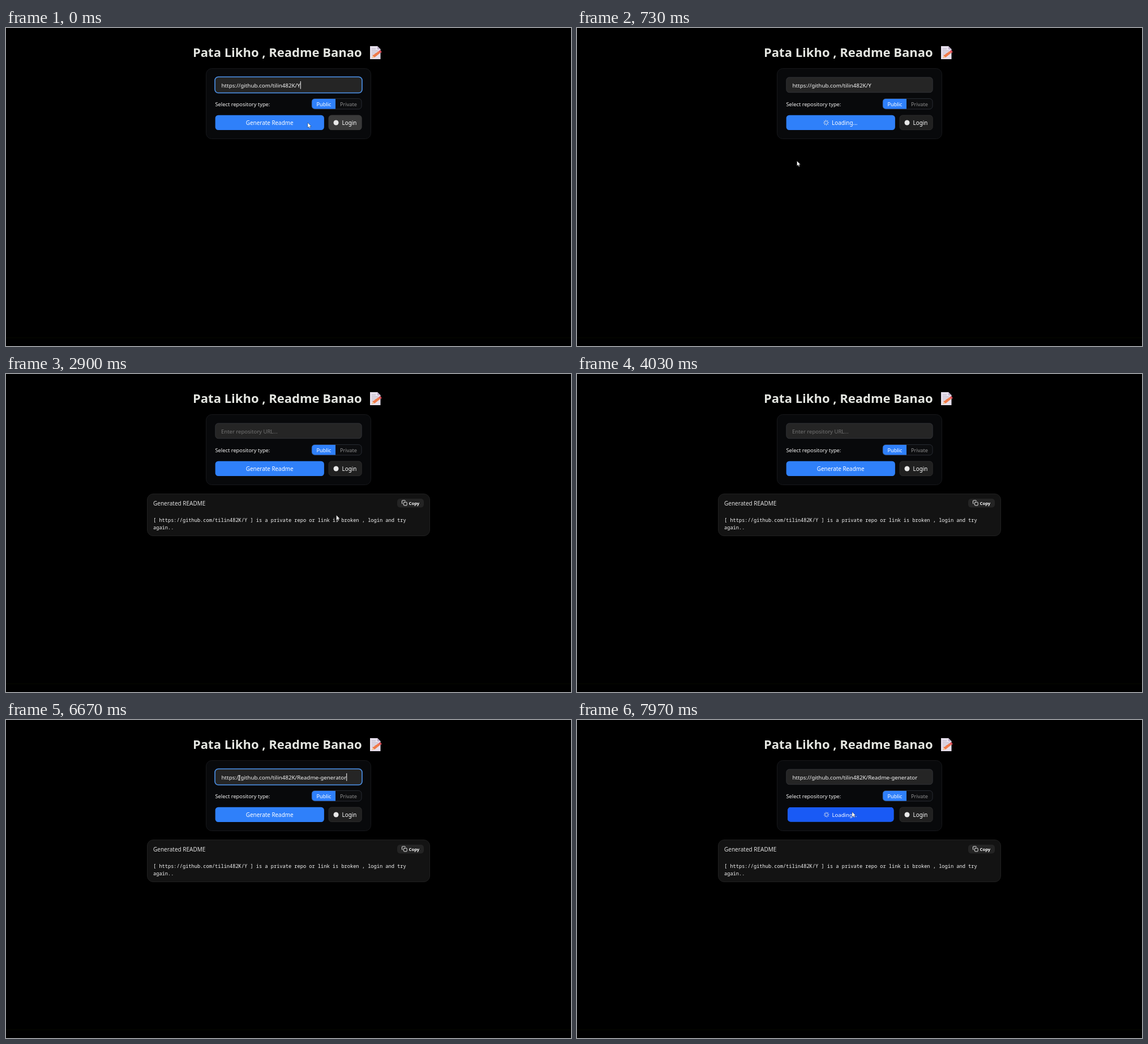
Write an HTML page that moves like this. It is 998x561 px and loops after 8000 ms.

```html
<!DOCTYPE html>
<html lang="en">
<head>
<meta charset="utf-8">
<title>Readme tool</title>
<style>
html, body { margin: 0; width: 100%; height: 100%; overflow: hidden; background: #000; }
svg { display: block; font-family: "Noto Sans", "Open Sans", sans-serif; }
text { fill: #f6f6f6; white-space: pre; }
.medium { font-weight: 500; fill: #fff; }
.center { text-anchor: middle; }
.mono { font: 8.67px "Noto Sans Mono", "DejaVu Sans Mono", monospace; }
.line { fill: none; stroke: #e8e8e8; stroke-linecap: round; stroke-linejoin: round; }
</style>
</head>
<body>
<svg width="998" height="561" viewBox="0 0 998 561">
  <rect y="546" width="998" height="1" fill="#070900"/>
  <text x="330" y="51" font-size="22" font-weight="700" style="fill:#e4e6e1">Pata Likho , Readme Banao</text>

  <g id="memo">
    <path d="M643 32h13l5.500 5.500V55H643z" fill="#e6dfec"/>
    <path d="M656 32v5.500h5.500z" fill="#b9a9c6"/>
    <path d="M646 37h7M646 40.500h11M646 44h9M646 47.500h5" stroke="#b5adbd"/>
    <path d="M646 53.500l1.500-5 3.500 3.500z" fill="#f3c797"/>
    <path d="M647.500 48.500l10.500-7.500 3 3-10 8z" fill="#f07a4a"/>
    <path d="M658 41l2.500-2 3.500 3.500-3 1.500z" fill="#e2505c"/>
  </g>

  <rect x="353.500" y="71.500" width="291" height="124" rx="10" fill="#08090b" stroke="#17181b"/>
  <rect x="369.800" y="87" width="258.400" height="26.700" rx="5.200" fill="#252525" stroke="#37383d" stroke-width=".8"/>
  <rect id="ring" x="369" y="86.300" width="260" height="28.200" rx="6" fill="none" stroke="#4b92ea" stroke-width="1.600"/>
  <text id="hint" x="380" y="104.500" font-size="9.500" style="fill:#737373">Enter repository URL...</text>
  <text id="url" x="380.500" y="104.500" font-size="9.800"></text>
  <rect id="caret" y="94" width="1" height="13.500" fill="#fff"/>

  <text x="369.500" y="137.500" font-size="9.300">Select repository type:</text>
  <rect x="540" y="124.600" width="88" height="18.500" rx="5.200" fill="#0c0d0f" stroke="#363a44" stroke-width=".7"/>
  <path d="M582 124.900v17.900h-36.700a5 5 0 0 1-5-5v-7.900a5 5 0 0 1 5-5z" fill="#2f80fa"/>
  <text class="medium center" x="561.500" y="137.500" font-size="9.200">Public</text>
  <text class="medium center" x="605" y="137.500" font-size="9.200" style="fill:#8e8e8e">Private</text>

  <g id="button">
    <rect x="369.650" y="153.700" width="192.250" height="26.200" rx="5.200" fill="#2f80fa"/>
    <rect id="dark" x="369.650" y="153.700" width="192.250" height="26.200" rx="5.200" fill="#195af5"/>
    <text id="generate" class="medium center" x="465.700" y="171.300" font-size="9.900">Generate Readme</text>
    <g id="loading">
      <path id="spinner" class="line"/>
      <text class="medium" x="450" y="171.300" font-size="9.900">Loading...</text>
    </g>
  </g>

  <rect x="570" y="154" width="58.200" height="25.600" rx="5.200" fill="#202020" stroke="#323232" stroke-width=".8"/>
  <rect id="loginHover" x="569.700" y="153.700" width="58.700" height="26.200" rx="5.200" fill="#3b3b3b"/>
  <circle cx="583" cy="167" r="4.500" fill="#e8e8e8"/>
  <text class="medium" x="593.500" y="171.300" font-size="9.900">Login</text>

  <g id="panel">
    <rect x="249.500" y="211.500" width="499" height="74" rx="10.500" fill="#131313" stroke="#202020"/>
    <text x="260" y="232.300" font-size="10" style="fill:#e0e0e0">Generated README</text>
    <rect x="691" y="220" width="47" height="15.500" rx="5" fill="#242424"/>
    <path class="line" d="M703.500 226.200h3.700a1 1 0 0 1 1 1v3.700a1 1 0 0 1-1 1h-3.700a1 1 0 0 1-1-1v-3.700a1 1 0 0 1 1-1zM700.500 229a1 1 0 0 1-1-1v-4a1 1 0 0 1 1-1h4a1 1 0 0 1 1 1"/>
    <text x="711.500" y="230.700" font-size="7.700" font-weight="600">Copy</text>
    <text class="mono" x="260" y="261">[ https://github.com/tilin482K/Y ] is a private repo or link is broken , login and try</text>
    <text class="mono" x="260" y="273.700">again..</text>
  </g>

  <g id="pointer">
    <path id="arrow" d="M0 0V8.800L2 7 3.300 9.900 4.800 9.200 3.500 6.500H6.200Z" fill="#fff" stroke="#111" stroke-width=".4"/>
    <path id="beam" class="line" d="M-1.500-4H1.500M0-4V4M-1.500 4H1.500"/>
  </g>
</svg>
<script>
const $ = id => document.getElementById(id);
const LOOP = 8000;
const BASE = 'https://github.com/tilin482K/';

const LOAD = 380, RESULT = 800, FOCUS = 5900, PASTE = 6670, RELOAD = 7930;
const EXIT = 3920, ENTER = 4600;

// Pointer path: time, x, y
const path = [
  [0, 533, 167], [150, 514, 167], [400, 510, 167], [730, 388.5, 234.5],
  [1250, 440, 258], [1700, 499.5, 265], [1850, 499.5, 265],
  [2150, 330, 263], [2480, 600, 258], [2700, 590, 250], [3370, 560, 245],
  [EXIT, 188, 16], [ENTER, 300, 13], [5050, 380, 85], [5400, 403, 102],
  [5780, 412, 102], [PASTE, 412, 102], [7180, 485.5, 162], [LOOP, 486, 162]
];

const ramp = (t, from, to) => Math.min(1, Math.max(0, (t - from) / (to - from)));
const smooth = k => k * k * (3 - 2 * k);
const pulse = (t, a, b, c, d) => smooth(ramp(t, a, b)) * (1 - smooth(ramp(t, c, d)));
const fade = (id, value) => $(id).setAttribute('opacity', value);
const show = (id, on) => fade(id, on ? 1 : 0);
const move = (id, value) => $(id).setAttribute('transform', value);

function pointerAt(t) {
  const i = path.findIndex(p => p[0] > t);
  const [t0, x0, y0] = path[i - 1], [t1, x1, y1] = path[i];
  const k = smooth(ramp(t, t0, t1));
  return [x0 + (x1 - x0) * k, y0 + (y1 - y0) * k];
}

let spokes = '';
for (let i = 0; i < 8; i++) {
  const c = Math.cos(i * Math.PI / 4), s = Math.sin(i * Math.PI / 4);
  spokes += `M${2.4 * c} ${2.4 * s}L${4.5 * c} ${4.5 * s}`;
}
$('spinner').setAttribute('d', spokes);

function draw(t) {
  const busy = t >= LOAD && t < RESULT || t >= RELOAD;
  const url = t < RESULT ? BASE + 'Y' : t >= PASTE ? BASE + 'Readme-generator' : '';
  if ($('url').textContent !== url) $('url').textContent = url;
  show('hint', !url);

  // Focus ring and blinking caret
  const focused = t < LOAD || t >= FOCUS && t < RELOAD;
  const since = t < LOAD ? t : t >= PASTE ? t - PASTE : t - FOCUS;
  fade('ring', !focused ? 0 : t < LOAD ? 1 : ramp(t, FOCUS - 40, FOCUS + 70));
  show('caret', focused && since % 1060 < 530);
  $('caret').setAttribute('x', 380 + (url ? $('url').getComputedTextLength() + 0.5 : 0));

  // Button states
  show('generate', !busy);
  show('loading', busy);
  move('spinner', `translate(440 167) rotate(${t * 0.36})`);
  fade('dark', pulse(t, 0, 150, 450, 600) + smooth(ramp(t, 7000, 7150)));
  const press = pulse(t, 250, 340, LOAD, 500) + smooth(ramp(t, 7800, 7900));
  move('button', `translate(465.75 166.75) scale(${1 - 0.026 * press}) translate(-465.75 -166.75)`);
  fade('loginHover', 1 - ramp(t, 0, 150));

  fade('panel', smooth(ramp(t, RESULT - 30, RESULT + 270)));

  const [x, y] = pointerAt(t);
  const inField = x > 369 && x < 629 && y > 87 && y < 114;
  show('pointer', t < EXIT || t >= ENTER);
  show('arrow', !inField);
  show('beam', inField);
  move('pointer', `translate(${x} ${y})`);
}

function tick() {
  draw(performance.now() % LOOP);
  requestAnimationFrame(tick);
}
tick();
</script>
</body>
</html>
```
